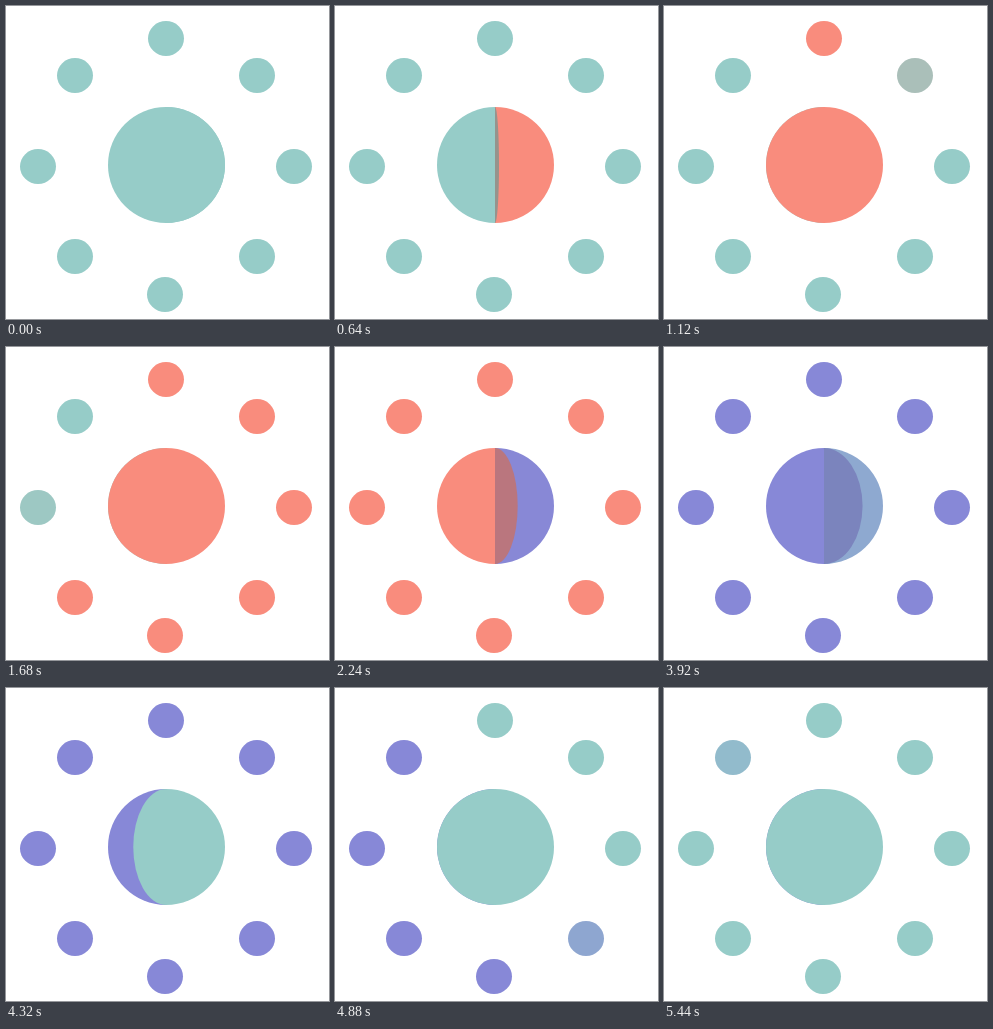
Write an HTML page with a canvas that moves like this. It is 323x313 px and loops after 5.52 s.

```html
<!DOCTYPE html>
<html lang="en">
<head>
<meta charset="utf-8">
<title>Flipping disc</title>
<style>
  html, body { margin: 0; width: 100%; height: 100%; overflow: hidden; background: #fff; }
  canvas { display: block; }
</style>
</head>
<body>
<canvas id="stage" width="323" height="313"></canvas>
<script>
const ctx = document.getElementById('stage').getContext('2d');
const LOOP = 5520, STEP = 80;
const TEAL = [150, 204, 200], CORAL = [249, 140, 125], PURPLE = [135, 136, 215];

// flip: when the disc starts turning; dots: when the first dot fades; each: fade time per dot
const PHASES = [
  { from: TEAL, to: CORAL, flip: 375, dots: 982, each: 115 },
  { from: CORAL, to: PURPLE, flip: 2076, dots: 2678, each: 116 },
  { from: PURPLE, to: TEAL, flip: 3840, dots: 4434, each: 129.8 }
];

// Clockwise from the top
const DOTS = [
  [160, 32.5], [251, 69.5], [288, 160.5], [251, 250.5],
  [159, 288.5], [69, 250.5], [32, 160.5], [69, 69.5]
];

const clamp = x => Math.max(0, Math.min(1, x));
const mix = (a, b, k) => a.map((v, i) => v + (b[i] - v) * k);
const shade = color => color.map(v => v * 0.6);

function ellipse(x, y, rx, ry, color, start = 0, end = 2 * Math.PI) {
  ctx.fillStyle = `rgb(${color.map(Math.round)})`;
  ctx.beginPath();
  ctx.ellipse(x, y, rx, ry, 0, start, end);
  ctx.fill();
}

// A half of the disc; scale squeezes it towards the vertical axis
function half(side, scale, color) {
  const start = side === 'right' ? -Math.PI / 2 : Math.PI / 2;
  ellipse(160, 159, (side === 'right' ? 59 : 58) * scale, 58, color, start, start + Math.PI);
}

function drawDisc({ from, to }, time) {
  const angle = time <= 0 ? 0
    : Math.min(180, 33 + 0.195 * time + 2.5 * Math.sin((time - 60) / 81));
  const scale = Math.cos(angle * Math.PI / 180);

  half('left', 1, from);
  half('right', 1, mix(from, to, clamp(time / 165)));
  if (scale > 0) {
    half('right', scale, mix(from, shade(to), angle / 180 * clamp(time / 80)));
  } else {
    half('left', -scale, to);
  }
}

function draw(t) {
  const phase = PHASES.findLast(p => t >= p.flip) || PHASES[0];
  const progress = (t - phase.dots) / phase.each;

  ctx.clearRect(0, 0, 323, 313);
  drawDisc(phase, t - phase.flip);
  DOTS.forEach(([x, y], i) =>
    ellipse(x, y, 18, 17.5, mix(phase.from, phase.to, clamp(progress - i))));
}

function tick() {
  const t = performance.now() % LOOP;
  draw(Math.floor(t / STEP) * STEP);
  requestAnimationFrame(tick);
}
tick();
</script>
</body>
</html>
```
